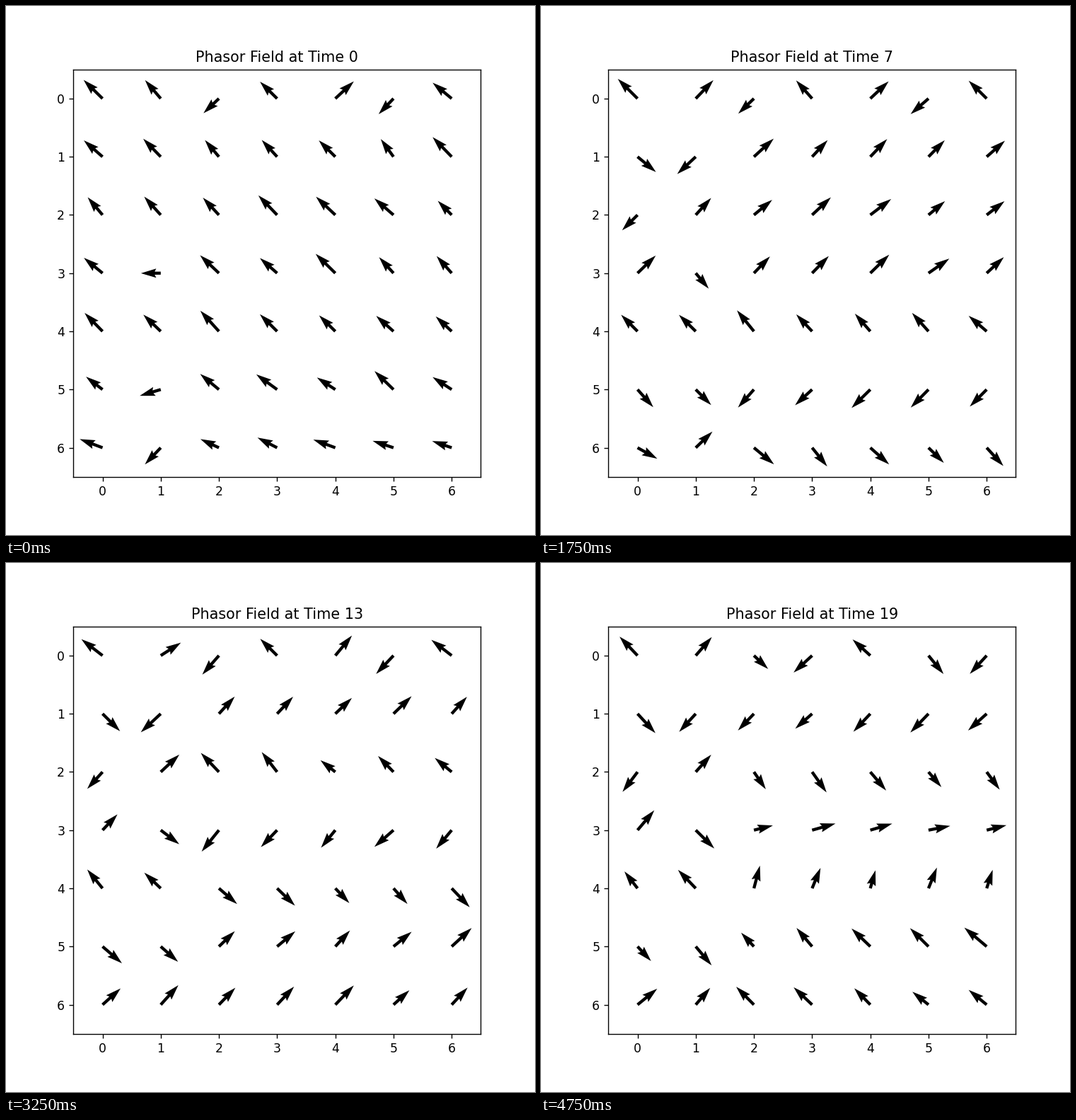
Recreate the animation shown at these times as a matplotlib script. Size 748 by 748 pixels, loop 5 s.

```python
import numpy as np
import matplotlib.pyplot as plt
from matplotlib.animation import FuncAnimation

SIZE, INCHES = 748, 6
N, FRAMES, INTERVAL = 7, 20, 250

rows, cols = np.mgrid[0:N, 0:N]

# Phases are counted in quarter turns: 0 = up right, 1 = up left, ...
start = 1 + .07 * rows

# Cells along the top and left settle early and then hold their direction.
rest = np.zeros((N, N))
rest[0] = [1, 0, 2, 1, 0, 2, 1]
rest[1:, 0] = [3, 2, 4, 1, 3, 4]
rest[1:, 1] = [2, 0, 3, 1, 3, 4]
border = (rows == 0) | (cols < 2)


def mix(a, b, s):
    return a + (b - a) * s


def snap(u):
    """Pull phases softly towards whole quarter turns."""
    for _ in range(2):
        u = u - np.sin(2 * np.pi * u) / (2 * np.pi)
    return u


def wave(t):
    """Turning wave that climbs from the bottom rows, pauses, then jumps."""
    middle = np.interp(t, [4, 7, 10, 13, 17, 19], [-1.6, .2, 1.05, 2, 2, 3.55])
    cap = np.interp(t, [17, 19], [4, 5])
    return mix(start, np.clip(middle + .9 * (rows - 3), 0, cap), min(t / 4, 1))


def settled(t):
    """Border cells reach their rest, lower ones later; the top thaws late."""
    progress = np.clip((t + cols) / (3 + rows), 0, 1)
    thaw = np.interp(t, [13, 17], [0, 1]) * (cols > 1) * (rows == 0)
    return mix(start, rest, progress) + thaw


def arrows_at(t):
    """Arrow components in pixels, with a little seeded noise."""
    rng = np.random.default_rng(t)
    turn = snap(np.where(border, settled(t), wave(t)))
    angle = np.radians(45 + 90 * turn + rng.normal(0, 4, turn.shape))
    off = np.abs(turn - np.round(turn))
    length = (34 - 16 * off) * rng.normal(1, .08, turn.shape)
    return length * np.cos(angle), length * np.sin(angle)


fig, ax = plt.subplots(figsize=(INCHES, INCHES), dpi=SIZE / INCHES)
ax.set_xlim(-.5, N - .5)
ax.set_ylim(N - .5, -.5)
ax.set_aspect("equal")
ax.set_xticks(range(N))
ax.set_yticks(range(N))
field = ax.quiver(cols, rows, *arrows_at(0), color="black",
                  scale=1, scale_units="dots", width=.0075)
title = ax.set_title("Phasor Field at Time 0")


def update(t):
    field.set_UVC(*arrows_at(t))
    title.set_text(f"Phasor Field at Time {t}")
    return field, title


anim = FuncAnimation(fig, update, frames=FRAMES, interval=INTERVAL,
                     repeat=True, repeat_delay=0, blit=False)
plt.show()
```
